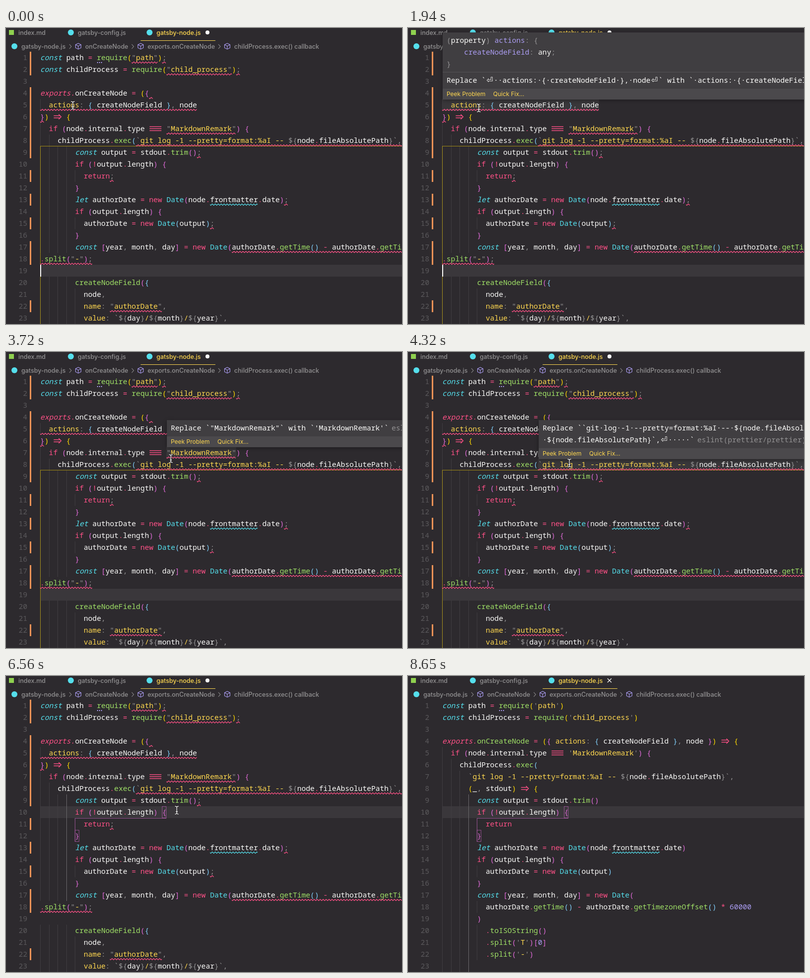
Recreate the animation shown at these times as an HTML page with a canvas. Size 800 px wide and 600 px high, loop 9100 ms.

```html
<!DOCTYPE html>
<html lang="en">
<head>
<meta charset="utf-8">
<title>Format on save</title>
<style>
html, body { margin: 0; width: 100%; height: 100%; overflow: hidden; background: #2d2a2e; }
canvas { display: block; width: 800px; height: 600px; }
</style>
</head>
<body>
<canvas id="stage" width="800" height="600"></canvas>
<script>
const ctx = document.getElementById('stage').getContext('2d');
const LOOP = 9100, STEP = 149.18, LAST = 60;
const LEFT = 69, CHAR = 8.8, ROW = 24;
const MONO = '500 14.667px "Noto Sans Mono", "DejaVu Sans Mono", monospace';
const UI = '500 12.5px Inter, Roboto, sans-serif';
const SMALL = '12px Inter, Roboto, sans-serif';
const C = {
  bg: '#2d2a2e', row: '#3a373b', white: '#fcfcfa', grey: '#939293', dim: '#5b595c',
  pink: '#ff5187', green: '#9fe066', yellow: '#ffd850', cyan: '#55dfec',
  purple: '#ab9df2', orange: '#ff9357', gold: '#ffd900', orchid: '#e06bd8', sky: '#80cffa',
  hover: '#403e41', bar: '#4b494c', guide: '#403d41', active: '#6b696c'
};
const PAIRS = [C.gold, C.orchid, C.sky];

const HEAD = `        if (!output.length) {
          return;
        }
        let authorDate = new Date(node.frontmatter.date);
        if (output.length) {
          authorDate = new Date(output);
        }
        const [year, month, day] = new Date(`;

const MESSY = `const path = require("path");
const childProcess = require("child_process");

exports.onCreateNode = ({
  actions: { createNodeField }, node
}) => {
  if (node.internal.type === "MarkdownRemark") {
    childProcess.exec(\`git log -1 --pretty=format:%aI -- \${node.fileAbsolutePath}\`, (_, stdout) => {
        const output = stdout.trim();
${HEAD}authorDate.getTime() - authorDate.getTimezoneOffset() * 60000).toISOString().split("T")[0]
.split("-");

        createNodeField({
          node,
          name: "authorDate",
          value: \`\${day}/\${month}/\${year}\`,`.split('\n');

const TIDY = `const path = require('path')
const childProcess = require('child_process')

exports.onCreateNode = ({ actions: { createNodeField }, node }) => {
  if (node.internal.type === 'MarkdownRemark') {
    childProcess.exec(
      \`git log -1 --pretty=format:%aI -- \${node.fileAbsolutePath}\`,
      (_, stdout) => {
        const output = stdout.trim()
${HEAD.replace(/;/g, '')}
          authorDate.getTime() - authorDate.getTimezoneOffset() * 60000
        )
          .toISOString()
          .split('T')[0]
          .split('-')
`.split('\n');

// [line, column, length]
const ERRORS = [
  [1, 21, 6], [1, 28, 1], [2, 29, 15], [2, 45, 1], [4, 25, 1], [5, 0, 36], [6, 0, 1],
  [7, 29, 16], [8, 22, 62], [9, 36, 1], [11, 16, 1], [13, 56, 1], [15, 39, 1],
  [17, 44, 40], [18, 0, 12], [22, 16, 12]
];
// [first line, last line]
const CHANGES = [[1, 2], [4, 9], [11, 11], [13, 13], [15, 15], [17, 18], [22, 22]];

const BLINKS = [2, 6, 9, 12, 16, 19, 22, 26, 29, 32, 36, 39, 44, 48, 51, 54, 58];
// [step, x, y]
const MOUSE = [
  [0, 135, 157], [12, 138, 159], [13, 143, 162], [14, 180, 173], [15, 250, 190],
  [16, 310, 200], [17, 338, 201], [23, 336, 206], [24, 335, 211], [25, 333, 216],
  [26, 330, 220], [27, 326, 225], [38, 328, 236], [39, 335, 250], [40, 343, 268], [41, 345, 272]
];
const CLICK = 41, SAVE = 48, SETTLE = 49, HIDE = 54;

const colX = col => LEFT + col * CHAR;
const rowY = line => 48 + (line - 1) * ROW;
const midY = line => rowY(line) + ROW / 2;

function rect(x, y, w, h, color) {
  ctx.fillStyle = color;
  ctx.fillRect(x, y, w, h);
}

function text(str, x, y, color, font = MONO) {
  ctx.font = font;
  ctx.fillStyle = color;
  ctx.fillText(str, x, y);
}

function path(points, color, width = 1) {
  ctx.strokeStyle = color;
  ctx.lineWidth = width;
  ctx.beginPath();
  points.forEach(([x, y], i) => i ? ctx.lineTo(x, y) : ctx.moveTo(x, y));
  ctx.stroke();
}

function disc(x, y, r, color) {
  ctx.fillStyle = color;
  ctx.beginPath();
  ctx.arc(x, y, r, 0, Math.PI * 2);
  ctx.fill();
}

function wordColor(word, rest) {
  if (/^(const|let|Date)$/.test(word)) return C.cyan;
  if (/^(exports|if|return|new)$/.test(word)) return C.pink;
  if (/^\d/.test(word)) return C.purple;
  if (rest[0] === '(' || rest.startsWith(' = ({ ')) return C.green;
  return rest[0] === ':' ? C.yellow : C.white;
}

// Splits code lines into [column, string, colour] tokens.
function highlight(lines) {
  let depth = 0;
  return lines.map(line => {
    const out = [];
    let mode = 'code', pos = 0;
    while (pos < line.length) {
      const re = mode === 'literal' ? /`|\$\{|(?:(?!`|\$\{).)+/y : /\s+|"[^"]*"|'[^']*'|===|=>|\w+|./y;
      re.lastIndex = pos;
      const tok = re.exec(line)[0];
      const end = pos + tok.length;
      let color = C.pink;
      if (mode === 'literal') {
        color = tok === '`' || tok === '${' ? C.grey : C.yellow;
        if (tok === '`') mode = 'code';
        if (tok === '${') mode = 'expr';
      } else if (tok === '`') {
        mode = 'literal';
        color = C.grey;
      } else if (mode === 'expr' && tok === '}') {
        mode = 'literal';
        color = C.grey;
      } else if (/^["']/.test(tok)) {
        out.push([pos, tok[0], C.grey], [end - 1, tok[0], C.grey]);
        out.push([pos + 1, tok.slice(1, -1), C.yellow]);
        pos = end;
        continue;
      } else if (/^[([{]$/.test(tok)) color = PAIRS[depth++ % 3];
      else if (/^[)\]}]$/.test(tok)) color = PAIRS[--depth % 3];
      else if (/^\w/.test(tok)) color = wordColor(tok, line.slice(end));
      else if (/^[,;:]$/.test(tok)) color = C.grey;
      if (tok.trim()) out.push([pos, tok, color]);
      pos = end;
    }
    return out;
  });
}

const DOCS = [MESSY, TIDY].map(lines => ({ lines, tokens: highlight(lines) }));

function drawToken([col, str, color], line) {
  const x = colX(col), y = midY(line);
  if (x > 800) return;
  if (str === '===') {
    for (const dy of [-4, 0, 4]) path([[x + 1, y + dy], [x + 25, y + dy]], color, 1.4);
  } else if (str === '=>') {
    for (const dy of [-2.2, 2.2]) path([[x + 1, y + dy], [x + 14, y + dy]], color, 1.4);
    path([[x + 11, y - 5], [x + 16, y], [x + 11, y + 5]], color, 1.4);
  } else {
    const slanted = /^(const|let|exports)$/.test(str);
    text(str, x, y + 5, color, slanted ? 'italic ' + MONO : MONO);
  }
}

function squiggle([line, col, len], color) {
  const x0 = colX(col), x1 = Math.min(800, colX(col + len)), y = midY(line) + 10;
  const pts = [];
  for (let x = x0, i = 0; x <= x1; x += 1.5, i++) pts.push([x, y + [0, 1.4, 0, -1.4][i % 4]]);
  path(pts, color, 1.2);
}

function indentOf(lines, i) {
  const own = j => lines[j] === undefined ? 8 : lines[j].search(/\S/);
  return lines[i].trim() ? own(i) : Math.min(own(i - 1), own(i + 1));
}

function drawGuides(lines, clicked) {
  lines.forEach((_, i) => {
    const indent = indentOf(lines, i);
    for (let col = 0; col < indent; col += 2) {
      const inner = clicked && col === 6 && (lines === TIDY || i < 17);
      rect(Math.round(colX(col)), rowY(i + 1), 1, ROW, inner ? C.active : C.guide);
    }
  });
}

// Lines and boxes of the bracket pair around the text cursor.
function drawScope(clicked) {
  ctx.save();
  ctx.globalAlpha = 0.55;
  if (clicked) {
    path([[324, 288.5], [139.5, 288.5], [139.5, 336]], C.orchid);
    ctx.strokeRect(315.5, 264.5, 8, 23);
    ctx.strokeRect(139.5, 312.5, 8, 23);
  } else path([[800, 239.5], [69.5, 239.5], [69.5, 600]], C.gold);
  ctx.restore();
}

function cube(x, y) {
  path([[x, y - 6], [x + 5.5, y - 3.2], [x + 5.5, y + 3.2], [x, y + 6], [x - 5.5, y + 3.2],
    [x - 5.5, y - 3.2], [x, y - 6]], C.purple, 1.1);
  path([[x - 5.5, y - 3.2], [x, y - 0.3], [x + 5.5, y - 3.2]], C.purple, 1.1);
  path([[x, y - 0.3], [x, y + 6]], C.purple, 1.1);
}

function drawHeader(saved) {
  rect(6, 4, 10, 10, '#8fd14f');
  text('index.md', 25, 14, C.grey, UI);
  disc(131, 9, 6, C.cyan);
  text('gatsby-config.js', 145, 14, C.grey, UI);
  disc(290, 9, 6, C.cyan);
  text('gatsby-node.js', 304, 14, C.yellow, UI);
  rect(272, 25, 151, 1, C.yellow);
  if (saved) {
    path([[403, 5], [411, 13]], C.white, 1.3);
    path([[411, 5], [403, 13]], C.white, 1.3);
  } else disc(407, 9, 4, C.white);

  disc(17, 37, 6, C.cyan);
  text('gatsby-node.js', 31, 42, C.grey, UI);
  const crumbs = [[146, 'onCreateNode'], [272, 'exports.onCreateNode'], [447, 'childProcess.exec() callback']];
  for (const [x, label] of crumbs) {
    path([[x - 18, 33], [x - 14, 37.5], [x - 18, 42]], C.grey, 1.1);
    cube(x, 37);
    text(label, x + 14, 42, C.grey, UI);
  }
}

// The return sign is wider than one cell, so the text is set in pieces around it.
function message(str, x, y) {
  for (const part of str.split(/(⏎)/)) {
    if (part === '⏎') {
      text(part, x + 1, y + 5, C.white, '16px "DejaVu Sans", sans-serif');
      x += 16;
    } else {
      text(part, x, y + 5, C.white);
      x += part.length * CHAR;
    }
  }
  return x;
}

function popup(x, y, h) {
  ctx.save();
  ctx.shadowColor = 'rgba(0,0,0,.35)';
  ctx.shadowBlur = 8;
  ctx.shadowOffsetY = 2;
  rect(x, y, 820, h, C.hover);
  ctx.restore();
  rect(x, y + h - 22, 820, 22, C.bar);
  text('Peek Problem', x + 8, y + h - 7, C.yellow, SMALL);
  text('Quick Fix...', x + 102, y + h - 7, C.yellow, SMALL);
}

function rule(x, y) {
  text('eslint(prettier/prettier)', x + 6, y + 5, C.grey);
}

const HOVERS = [
  {
    from: 1, to: 15, range: [5, 0, 36],
    draw() {
      popup(70, 9, 136);
      const cell = (col, line, str, color) => text(str, 78 + col * CHAR, line * ROW + 6, color);
      cell(0, 1, '(', C.grey);
      cell(1, 1, 'property', C.white);
      cell(9, 1, ')', C.grey);
      cell(11, 1, 'actions', C.purple);
      cell(18, 1, ': {', C.grey);
      cell(4, 2, 'createNodeField', C.purple);
      cell(19, 2, ':', C.grey);
      cell(21, 2, 'any', C.white);
      cell(24, 2, ';', C.grey);
      cell(0, 3, '}', C.grey);
      rect(70, 89, 730, 1, '#555356');
      message('Replace `⏎··actions:·{·createNodeField·},·node⏎` with `·actions:·{·createNodeField·},·node·`', 78, 106);
    }
  },
  {
    from: 20, to: 26, range: [7, 29, 16],
    draw() {
      popup(325, 138, 55);
      rule(message('Replace `"MarkdownRemark"` with `\'MarkdownRemark\'`', 333, 154), 154);
    }
  },
  {
    from: 29, to: 39, range: [8, 22, 62],
    draw() {
      popup(264, 138, 79);
      message('Replace ``git·log·-1·--pretty=format:%aI·--·${node.fileAbsolutePath}`,', 272, 154);
      rule(message('·${node.fileAbsolutePath}`,⏎·····`', 272, 178), 178);
    }
  }
];

function drawMouse(step) {
  const [, x, y] = MOUSE.filter(m => m[0] <= step).pop();
  for (const [color, width] of [['#1b191c', 2.6], [C.white, 1.3]]) {
    path([[x - 3.5, y - 8], [x - 1, y - 7.5], [x, y - 6], [x, y + 6], [x - 1, y + 7.5], [x - 3.5, y + 8]], color, width);
    path([[x + 3.5, y - 8], [x + 1, y - 7.5], [x, y - 6]], color, width);
    path([[x + 3.5, y + 8], [x + 1, y + 7.5], [x, y + 6]], color, width);
    path([[x - 2, y + 3], [x + 2, y + 3]], color, width);
  }
}

function draw(step) {
  const clicked = step >= CLICK, saved = step >= SAVE;
  const { lines, tokens } = DOCS[saved ? 1 : 0];
  const hover = HOVERS.find(h => step >= h.from && step < h.to);

  rect(0, 0, 800, 600, C.bg);
  drawHeader(saved);
  rect(70, rowY(clicked ? 10 : 19), 730, ROW, C.row);
  if (hover) {
    const [line, col, len] = hover.range;
    rect(colX(col), rowY(line), len * CHAR, ROW, 'rgba(255,255,255,.06)');
  }
  if (step < SETTLE) {
    for (const [a, b] of CHANGES) rect(48, rowY(a), 3, (b - a + 1) * ROW, C.orange);
  }
  drawGuides(lines, clicked);
  drawScope(clicked);

  ctx.textAlign = 'right';
  for (let n = 1; n <= 23; n++) text(n, 43, midY(n) + 5, C.dim);
  ctx.textAlign = 'left';
  tokens.forEach((row, i) => row.forEach(tok => drawToken(tok, i + 1)));

  if (!saved) ERRORS.forEach(e => squiggle(e, C.pink));
  squiggle([13, 39, 11], C.cyan);
  for (let i = 0; i < 3; i++) rect(184 + i * 4, 69, 2, 2, C.purple);

  if (BLINKS.filter(b => b <= step).length % 2 === 0) {
    if (clicked) rect(323, 264, 2, ROW, C.white);
    else rect(69, 480, 2, ROW, C.white);
  }
  if (hover) hover.draw();
  if (step < HIDE) drawMouse(step);
}

const start = performance.now();
let shown = -1;
function tick() {
  const t = (performance.now() - start) % LOOP;
  const step = Math.min(LAST, Math.floor((t + 14) / STEP));
  if (step !== shown) draw(shown = step);
  requestAnimationFrame(tick);
}
tick();
</script>
</body>
</html>
```
